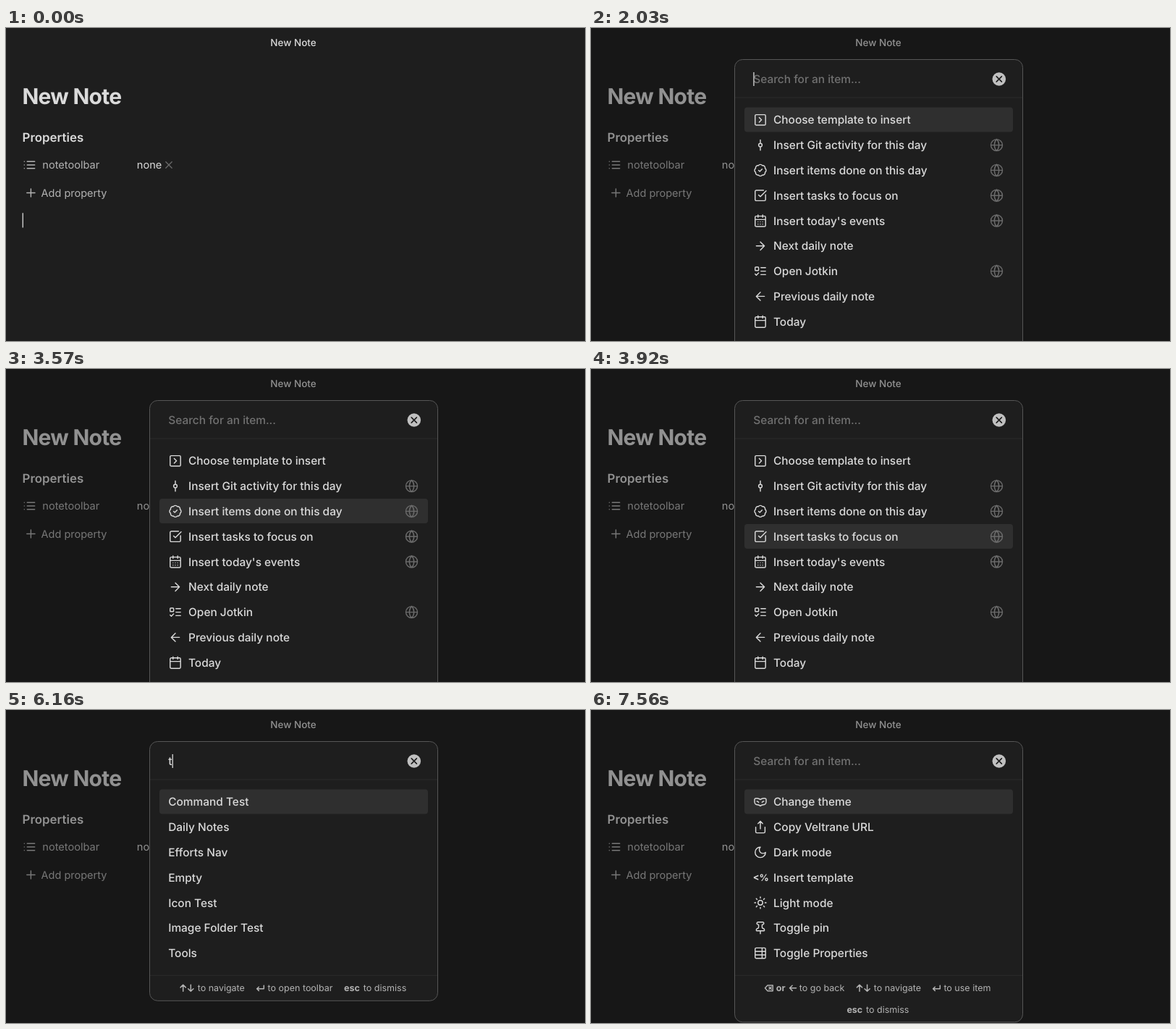
An HTML page for the animation above (8 s loop, 800 by 432 pixels).

```html
<!DOCTYPE html>
<html lang="en">
<head>
<meta charset="utf-8">
<title>Toolbar picker</title>
<style>
  html, body { margin: 0; width: 100%; height: 100%; overflow: hidden; background: #1e1e1e; }
  svg { display: block; width: 800px; height: 432px; }
  text {
    font-family: Inter, "Noto Sans", sans-serif;
    font-optical-sizing: none;
    text-rendering: geometricPrecision;
    white-space: pre;
  }
  .icon { fill: none; stroke-linecap: round; stroke-linejoin: round; }
</style>
</head>
<body>
<svg id="stage" viewBox="0 0 800 432" xmlns="http://www.w3.org/2000/svg"></svg>
<script>
const stage = document.getElementById('stage');
const LOOP = 8000;
const TEXT = '#dadada', MUTED = '#b3b3b3', FAINT = '#6a6a6a', LINE = '#2b2b2b';
const ROW_TOP = 109.5, ROW_H = 34, PITCH = 34.8, ROW_SIZE = 15.45;

// Icon paths on a 24-unit grid
const box = (x, y, w, h, r) =>
  `M${x + r} ${y}h${w - 2 * r}a${r} ${r} 0 0 1 ${r} ${r}v${h - 2 * r}a${r} ${r} 0 0 1-${r} ${r}` +
  `h-${w - 2 * r}a${r} ${r} 0 0 1-${r}-${r}v-${h - 2 * r}a${r} ${r} 0 0 1 ${r}-${r}z`;
const ring = r => `M${12 - r} 12a${r} ${r} 0 1 0 ${2 * r} 0a${r} ${r} 0 1 0-${2 * r} 0z`;
const calendar = 'M8 2v4M16 2v4M3 10h18' + box(3, 4, 18, 18, 2);
const dots = [14, 18].flatMap(y => [8, 12, 16].map(x => `M${x} ${y}h.01`)).join('');

const ICONS = {
  list: 'M3 6h.01M3 12h.01M3 18h.01M8 6h13M8 12h13M8 18h13',
  plus: 'M5 12h14M12 5v14',
  chevron: box(3, 3, 18, 18, 2) + 'M10 8l4 4-4 4',
  commit: 'M12 3v6M12 15v6' + ring(3),
  badge: 'M3.85 8.62a4 4 0 0 1 4.78-4.77 4 4 0 0 1 6.74 0 4 4 0 0 1 4.78 4.78 4 4 0 0 1 0 6.74 ' +
    '4 4 0 0 1-4.77 4.78 4 4 0 0 1-6.75 0 4 4 0 0 1-4.78-4.77 4 4 0 0 1 0-6.76zM9 12l2 2 4-4',
  check: 'M21 10.5V19a2 2 0 0 1-2 2H5a2 2 0 0 1-2-2V5a2 2 0 0 1 2-2h12.5M9 11l3 3L22 4',
  calendar,
  days: calendar + dots,
  right: 'M5 12h14M12 5l7 7-7 7',
  left: 'M19 12H5M12 5l-7 7 7 7',
  todo: box(3, 5, 6, 6, 1) + 'M3 17l2 2 4-4M13 6h8M13 12h8M13 18h8',
  globe: ring(10) + 'M12 2a14.5 14.5 0 0 0 0 20 14.5 14.5 0 0 0 0-20M2 12h20',
  mask: 'M18 11c-1.5 0-2.5.5-3 2M6 11c1.5 0 2.5.5 3 2M4 6a2 2 0 0 0-2 2v4a5 5 0 0 0 5 5 8 8 0 0 1 5 2 ' +
    '8 8 0 0 1 5-2 5 5 0 0 0 5-5V8a2 2 0 0 0-2-2h-3a8 8 0 0 0-5 2 8 8 0 0 0-5-2z',
  share: 'M4 12v8a2 2 0 0 0 2 2h12a2 2 0 0 0 2-2v-8M16 6l-4-4-4 4M12 2v13',
  moon: 'M12 3a6 6 0 0 0 9 9 9 9 0 1 1-9-9z',
  sun: ring(4) + 'M12 2v2M12 20v2M2 12h2M20 12h2M4.93 4.93l1.41 1.41M17.66 17.66l1.41 1.41' +
    'M6.34 17.66l-1.41 1.41M19.07 4.93l-1.41 1.41',
  pin: 'M12 17v5M9 10.76a2 2 0 0 1-1.11 1.79l-1.78.9A2 2 0 0 0 5 15.24V16a1 1 0 0 0 1 1h12a1 1 0 0 0 1-1' +
    'v-.76a2 2 0 0 0-1.11-1.79l-1.78-.9A2 2 0 0 1 15 10.76V7a1 1 0 0 1 1-1 2 2 0 0 0 0-4H8a2 2 0 0 0 0 4 1 1 0 0 1 1 1z',
  table: box(3, 3, 18, 18, 2) + 'M3 9h18M3 15h18M15 3v18'
};

// Each view: placeholder and rows of [label, icon, has globe]
const VIEWS = {
  toolbars: {
    hint: 'Search for a toolbar...',
    rows: ['Command Test', 'Daily Notes', 'Efforts Nav', 'Emojis', 'Empty', 'Global Nav',
      'Home', 'Icon Test', 'Image Folder Test', 'Tools'].map(label => [label])
  },
  daily: {
    hint: 'Search for an item...',
    rows: [
      ['Choose template to insert', 'chevron'],
      ['Insert Git activity for this day', 'commit', true],
      ['Insert items done on this day', 'badge', true],
      ['Insert tasks to focus on', 'check', true],
      ["Insert today's events", 'days', true],
      ['Next daily note', 'right'],
      ['Open Jotkin', 'todo', true],
      ['Previous daily note', 'left'],
      ['Today', 'calendar']
    ]
  },
  tools: {
    hint: 'Search for an item...',
    rows: [
      ['Change theme', 'mask'],
      ['Copy Veltrane URL', 'share'],
      ['Dark mode', 'moon'],
      ['Insert template', '<%'],
      ['Light mode', 'sun'],
      ['Toggle pin', 'pin'],
      ['Toggle Properties', 'table']
    ]
  }
};

const STEPS = [
  [0, { view: null, query: '', row: 0, caret: true }],
  [140, { caret: false }],
  [490, { view: 'toolbars', caret: true }],
  [980, { caret: false }],
  [1120, { query: 'd', caret: true }],
  [1190, { query: 'da' }],
  [1330, { query: 'dai' }],
  [1470, { caret: false }],
  [1960, { view: 'daily', query: '', caret: true }],
  [2520, { caret: false }],
  [3010, { caret: true }],
  [3290, { row: 1 }],
  [3500, { row: 2, caret: false }],
  [3780, { row: 3 }],
  [4060, { row: 4, caret: true }],
  [4620, { caret: false }],
  [4900, { view: 'toolbars', row: 0, caret: true }],
  [5390, { caret: false }],
  [5950, { caret: true }],
  [6160, { query: 't' }],
  [6300, { query: 'to' }],
  [6440, { query: 'too' }],
  [6650, { query: 'tool' }],
  [7070, { view: 'tools', query: '' }],
  [7560, { caret: false }]
];

const esc = s => s.replace(/&/g, '&amp;').replace(/</g, '&lt;');
const text = (x, y, size, str, fill = TEXT, extra = '') =>
  `<text x="${x}" y="${y}" font-size="${size}" fill="${fill}" ${extra}>${esc(str)}</text>`;
const rect = (x, y, w, h, fill, extra = '') =>
  `<rect x="${x}" y="${y}" width="${w}" height="${h}" fill="${fill}" ${extra}/>`;
const stroke = (d, color, width, extra = '') =>
  `<path class="icon" d="${d}" stroke="${color}" stroke-width="${width}" ${extra}/>`;
const icon = (name, cx, cy, color = TEXT, s = 0.8) =>
  stroke(ICONS[name], color, 1.8, `transform="translate(${cx - 12 * s} ${cy - 12 * s}) scale(${s})"`);
const cross = (cx, cy, r, color, width) =>
  stroke(`M${cx - r} ${cy - r}l${2 * r} ${2 * r}M${cx + r} ${cy - r}l${-2 * r} ${2 * r}`, color, width);
const caretBar = (x, y, h) => rect(x, y, 1.3, h, TEXT);

const BOLD = 'font-weight="700"', BOOK = 'font-weight="450"';

function note(caret) {
  return rect(0, 0, 800, 432, '#1e1e1e') +
    text(397, 24.8, 13.5, 'New Note', TEXT, 'font-weight="500" text-anchor="middle"') +
    text(22.5, 105.3, 30, 'New Note', TEXT, BOLD + ' letter-spacing="-.75"') +
    text(22.5, 157, 16.9, 'Properties', TEXT, 'font-weight="600"') +
    icon('list', 32.5, 189, MUTED) +
    text(50.3, 194.4, 14.6, 'notetoolbar', MUTED) +
    text(180.8, 194.4, 14.6, 'none') +
    cross(225, 189, 4.2, FAINT, 1.3) +
    icon('plus', 34.4, 227.5, MUTED) +
    text(48.6, 232.6, 14.5, 'Add property', MUTED) +
    (caret ? caretBar(22.6, 255.3, 20.2) : '');
}

// Footer key glyphs, drawn around a centre
const key = (d, x, y) => stroke(d, MUTED, 1.5, `transform="translate(${x} ${y})"`);
const upDown = (x, y) =>
  key('M0 4.5v-9M-3.6-.9L0-4.5 3.6-.9', x, y) + key('M0-4.5v9M-3.6.9L0 4.5 3.6.9', x + 10.6, y);
const enter = (x, y) => key('M5-3.5v4.5h-9.5M-2-1.6L-4.7 1l2.7 2.6', x, y);
const backArrow = (x, y) => key('M4.5 0h-9M-.9-3.6L-4.5 0l3.6 3.6', x, y);
const erase = (x, y) => key('M-2-3.9h7.2v7.8H-2L-5.5 0zM0-1.6l3.2 3.2M3.2-1.6L0 1.6', x, y);
const hint = (x, y, str, extra) => text(x, y + 4.5, 12.5, str, MUTED, extra);

function footer(view, y) {
  if (view === 'toolbars') {
    return upDown(244.7, y) + hint(264.7, y, 'to navigate') +
      enter(351.3, y) + hint(361.6, y, 'to open toolbar') +
      hint(467, y, 'esc', BOLD) + hint(493.8, y, 'to dismiss');
  }
  return erase(246, y) + hint(255.8, y, 'or', BOLD) + backArrow(279, y) + hint(287.8, y, 'to go back') +
    upDown(371, y) + hint(390.8, y, 'to navigate') +
    enter(477.3, y) + hint(487.4, y, 'to use item') +
    hint(353.4, y + 29.4, 'esc', BOLD) + hint(380, y + 29.4, 'to dismiss');
}

function listRow([label, name, globe], i, active) {
  const top = ROW_TOP + i * PITCH, cy = top + 17.3;
  let out = i === active ? rect(212, top, 371, ROW_H, '#2f2f2f', 'rx="4"') : '';
  if (ICONS[name]) out += icon(name, 234, cy);
  else if (name) out += text(223.8, cy + 4.7, 13, name, TEXT, BOLD);
  out += text(name ? 252 : 224.2, cy + 5.6, ROW_SIZE, label, TEXT, BOOK);
  return out + (globe ? icon('globe', 560.5, cy, FAINT) : '');
}

function picker({ view, query, row }) {
  const { hint: placeholder, rows } = VIEWS[view];
  const shown = rows.filter(([label]) => label.toLowerCase().includes(query));
  const sep = ROW_TOP + (shown.length - 1) * PITCH + 48;
  const bottom = sep + (view === 'toolbars' ? 35 : 64.5);
  return rect(0, 0, 800, 432, '#0a0a0a', 'opacity=".35"') +
    rect(198.5, 43.5, 398, bottom - 43.5, '#1e1e1e', 'rx="11" stroke="#565656"') +
    rect(199, 95.5, 397, 1, LINE) +
    (query ? text(224.2, 76.4, ROW_SIZE, query, TEXT, BOOK + ' id="query"')
      : text(224.2, 76.4, ROW_SIZE, placeholder, '#717171', BOOK)) +
    '<circle cx="563.8" cy="70.5" r="9.3" fill="#c0c0c0"/>' +
    cross(563.8, 70.5, 3.6, '#1e1e1e', 1.6) +
    shown.map((r, i) => listRow(r, i, row)).join('') +
    rect(199, sep - 0.5, 397, 1, LINE) +
    footer(view, sep + 17.5);
}

function stateAt(t) {
  return Object.assign({}, ...STEPS.filter(([at]) => at <= t).map(([, patch]) => patch));
}

let last = '';
function draw(t) {
  const state = stateAt(t), id = JSON.stringify(state);
  if (id === last) return;
  last = id;
  stage.innerHTML = note(state.caret && !state.view) + (state.view ? picker(state) : '');
  if (state.view && state.caret) {
    const typed = document.getElementById('query');
    const x = 224.3 + (typed ? typed.getComputedTextLength() : 0);
    stage.insertAdjacentHTML('beforeend', caretBar(x, 61, 19));
  }
}

const start = performance.now();
function tick() {
  draw((performance.now() - start) % LOOP);
  requestAnimationFrame(tick);
}
tick();
</script>
</body>
</html>
```
